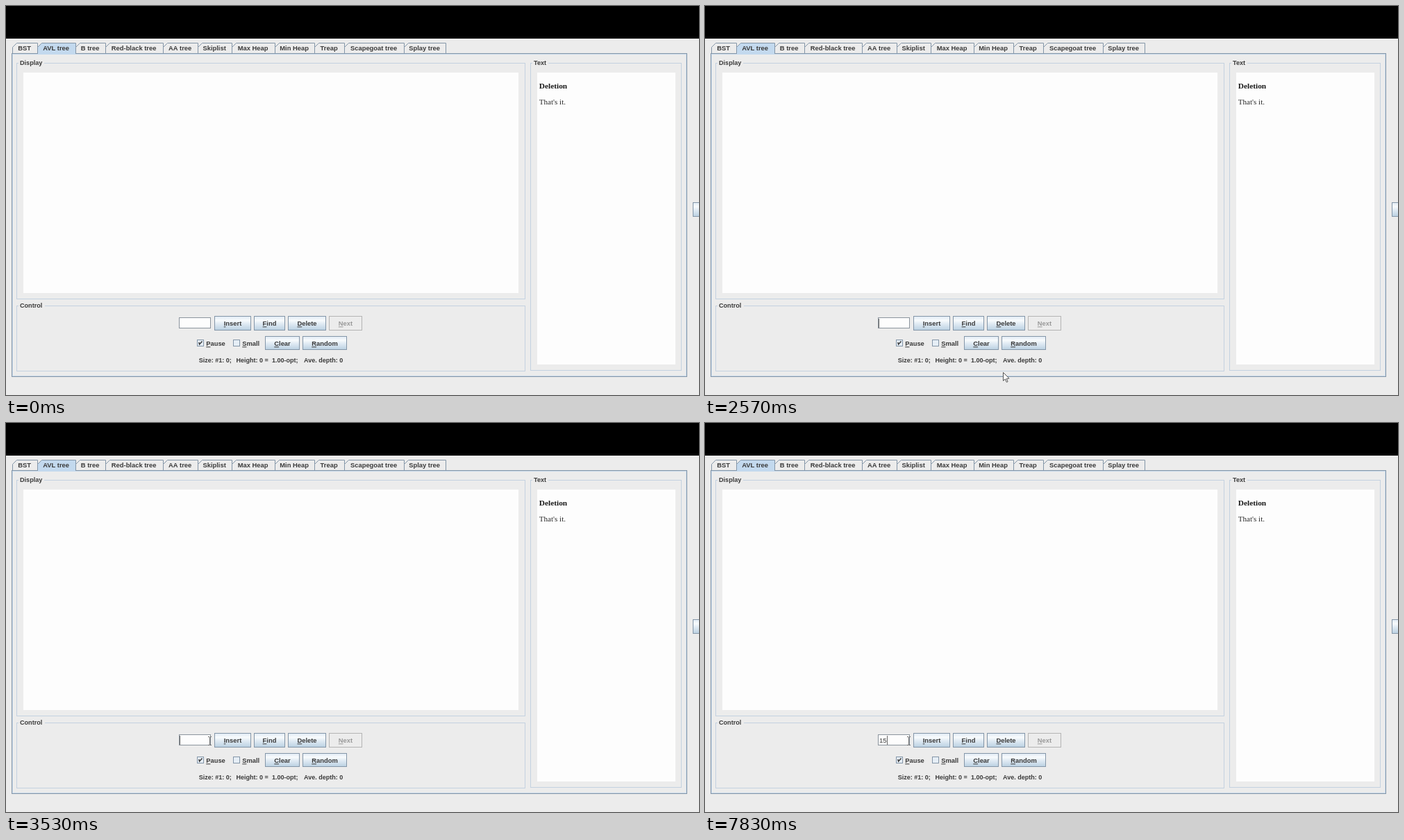
Animation, 998 px wide and 561 px high, one loop 8000 ms. Source, as an HTML page with a canvas:

```html
<!DOCTYPE html>
<html lang="en">
<head>
<meta charset="utf-8">
<title>Search tree viewer</title>
<style>
  html, body { margin: 0; width: 100%; height: 100%; overflow: hidden; background: #ececec; }
  canvas { display: block; }
</style>
</head>
<body>
<canvas id="stage" width="998" height="561"></canvas>
<script>
const ctx = document.getElementById('stage').getContext('2d');
const LOOP = 8000;
const BLINK = 515, BLINK_ON = 3515;
const KEY_TIMES = [7200, 7530], TYPED = '15';
const SANS = '"Liberation Sans", Arial, sans-serif';
const SERIF = '"Liberation Serif", Times, serif';
const EDGE = '#8496a8', PALE = '#c3d1e0', INK = '#3a3a3a', BACK = '#ececec', PAPER = '#fdfdfd';

function rect(x, y, w, h, color) {
  ctx.fillStyle = color;
  ctx.fillRect(x, y, w, h);
}

function frame(x, y, w, h, color) {
  ctx.strokeStyle = color;
  ctx.lineWidth = 1;
  ctx.strokeRect(x + .5, y + .5, w - 1, h - 1);
}

function text(str, x, y, { font = `bold 9.4px ${SANS}`, color = INK, align = 'left', mnemonic = false } = {}) {
  ctx.font = font;
  ctx.fillStyle = color;
  const left = align === 'center' ? x - ctx.measureText(str).width / 2 : x;
  ctx.fillText(str, left, y);
  if (mnemonic) rect(left, y + 1.3, ctx.measureText(str[0]).width, 1, color);
}

function polygon(points, fill, stroke, closed = true) {
  ctx.beginPath();
  points.forEach(([x, y]) => ctx.lineTo(x, y));
  if (closed) ctx.closePath();
  ctx.fillStyle = fill;
  ctx.fill();
  ctx.strokeStyle = stroke;
  ctx.lineWidth = 1;
  ctx.stroke();
}

function tab(label, x, right, selected) {
  const l = x + .5, r = right + .5;
  polygon([[l, 68], [l, 59.5], [l + 6, 53.5], [r, 53.5], [r, 68]],
    selected ? '#c3d9ee' : BACK, EDGE, false);
  text(label, (x + right) / 2 - .4, 64, { align: 'center' });
}

function group(title, x, y, w, h, gap) {
  frame(x, y, w, h, PALE);
  rect(x + 3, y - 1, gap, 3, BACK);
  text(title, x + 5, y + 3, { font: `bold 9.1px ${SANS}` });
}

function button(label, x, y, w, h, enabled = true) {
  if (enabled) {
    const shade = ctx.createLinearGradient(0, y, 0, y + h);
    shade.addColorStop(0, '#dde8f3');
    shade.addColorStop(.3, '#f8fbfd');
    shade.addColorStop(.5, '#e4edf5');
    shade.addColorStop(1, '#b8cfe1');
    rect(x, y, w, h, shade);
  }
  frame(x, y, w, h, enabled ? EDGE : '#b4b4b4');
  if (label) text(label, x + w / 2, Math.floor(y + h / 2) + 4,
    { align: 'center', mnemonic: true, color: enabled ? INK : '#999' });
}

function checkbox(label, x, checked) {
  rect(x, 481, 10, 10, '#e6eef6');
  frame(x, 481, 10, 10, EDGE);
  if (checked) {
    ctx.strokeStyle = INK;
    ctx.lineWidth = 1.5;
    ctx.beginPath();
    ctx.moveTo(x + 2.8, 485);
    ctx.lineTo(x + 3.6, 488);
    ctx.lineTo(x + 7.5, 483.5);
    ctx.stroke();
  }
  text(label, x + 13.2, 490, { mnemonic: true });
}

function drawWindow() {
  rect(0, 0, 998, 561, BACK);
  rect(0, 0, 998, 47, '#000');

  frame(8, 68, 973, 467, EDGE);
  frame(9, 69, 971, 465, '#c8d9ea');
  const edges = [9, 45, 100, 143, 226, 276, 325, 387, 444, 487, 573, 633];
  ['BST', 'AVL tree', 'B tree', 'Red-black tree', 'AA tree', 'Skiplist', 'Max Heap',
    'Min Heap', 'Treap', 'Scapegoat tree', 'Splay tree']
    .forEach((label, i) => tab(label, edges[i], edges[i + 1], i === 1));
  rect(46, 68, 54, 2, '#c3d9ee');

  group('Display', 15, 82, 733, 341, 37);
  rect(25, 96, 713, 318, PAPER);
  group('Control', 15, 432, 733, 95, 38);
  group('Text', 755, 82, 218, 444, 23);
  rect(765, 96, 199, 421, PAPER);
  text('Deletion', 767.7, 119, { font: `bold 11.4px ${SERIF}`, color: '#1a1a1a' });
  text("That's it.", 767.7, 142, { font: `11.1px ${SERIF}`, color: '#2a2a2a' });

  button('Insert', 300, 447, 53, 21);
  button('Find', 357, 447, 45, 21);
  button('Delete', 406, 447, 55, 21);
  button('Next', 465, 447, 48, 21, false);
  checkbox('Pause', 275, true);
  checkbox('Small', 327, false);
  button('Clear', 373, 476, 50, 20);
  button('Random', 427, 476, 64, 20);
  button('', 989, 283, 20, 21);

  const status = { font: `bold 9px ${SANS}` };
  text('Size: #1: 0;', 277.7, 514, status);
  text('Height: 0 =', 331.5, 514, status);
  text('1.00-opt;', 383, 514, status);
  text('Ave. depth: 0', 429, 514, status);
}

function drawField(t) {
  rect(249, 449, 46, 16, PAPER);
  frame(249, 449, 46, 16, '#8b949d');
  const typed = TYPED.slice(0, KEY_TIMES.filter(k => t >= k).length);
  text(typed, 251, 461, { font: `9.6px ${SANS}` });
  const blinkOn = Math.floor((t - BLINK_ON) / BLINK) % 2 === 0;
  if (typed || blinkOn) {
    const x = typed ? 251 + Math.round(ctx.measureText(typed).width) : 250;
    rect(x, 451, 1, 13, '#666');
  }
}

// Pointer path: time, x, y
const PATH = [
  [2130, 474, 561], [2400, 440, 537], [2570, 428, 528], [2680, 488, 539],
  [2900, 338, 476], [3130, 312, 460], [3370, 299, 452], [3460, 293, 458]
];

function pointerAt(t) {
  if (t < PATH[0][0]) return null;
  const next = PATH.findIndex(p => p[0] > t);
  if (next < 0) return PATH[PATH.length - 1].slice(1);
  const [t0, x0, y0] = PATH[next - 1], [t1, x1, y1] = PATH[next];
  const k = (t - t0) / (t1 - t0);
  return [x0 + (x1 - x0) * k, y0 + (y1 - y0) * k];
}

function drawTextPointer(x, y) {
  const color = '#6a6a6a';
  rect(x, y - 5, 1, 11, color);
  for (const end of [y - 6, y + 6]) {
    rect(x - 2, end, 2, 1, color);
    rect(x + 1, end, 2, 1, color);
  }
}

function drawPointer(t) {
  const at = pointerAt(t);
  if (!at) return;
  const [x, y] = at.map(Math.round);
  if (x < 296) return drawTextPointer(x, y);
  const shape = [[0, 0], [0, 12], [2.8, 9.5], [4.8, 14], [6.6, 13.2], [4.7, 9], [8.5, 8.6]];
  polygon(shape.map(([dx, dy]) => [x + .5 + dx, y + .5 + dy]), '#fff', '#555');
}

function draw(now) {
  const t = now % LOOP;
  drawWindow();
  drawField(t);
  drawPointer(t);
  requestAnimationFrame(draw);
}
draw(0);
</script>
</body>
</html>
```
